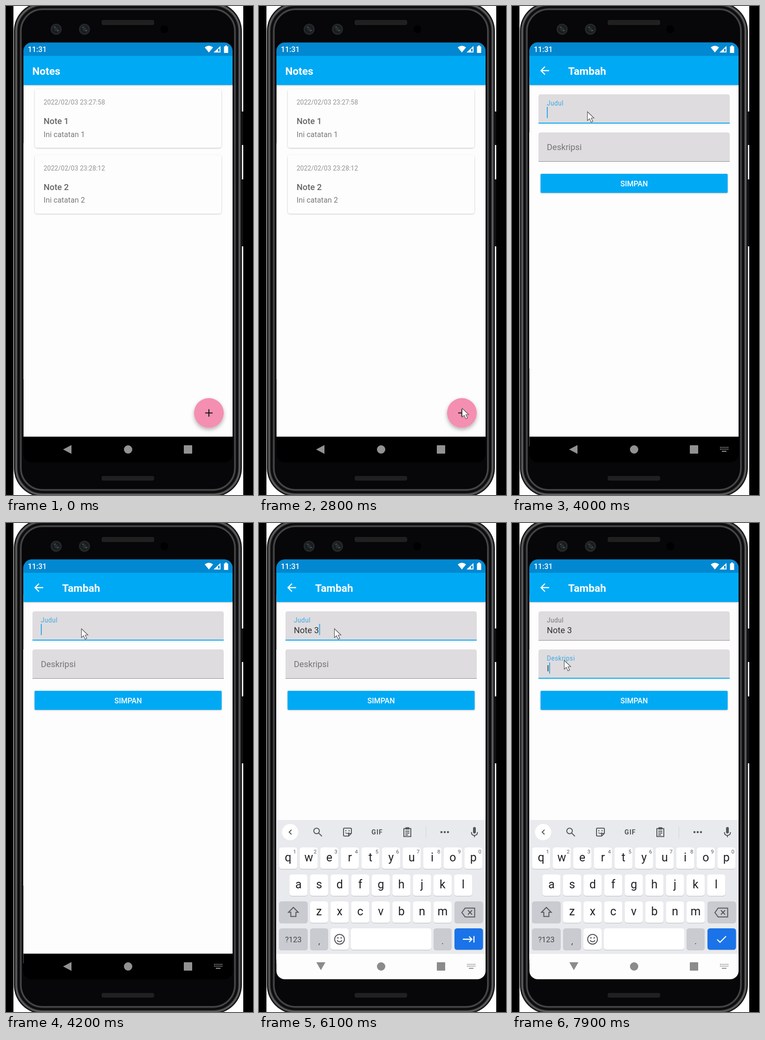
These frames come from a looping animation (532x1052 px, 8 s). An HTML page:

```html
<!DOCTYPE html>
<html lang="id">
<head>
<meta charset="utf-8">
<title>Notes</title>
<style>
html, body { margin: 0; width: 100%; height: 100%; overflow: hidden; background: #000; }
svg { display: block; width: 100vw; height: 100vh; font-family: Roboto, sans-serif; }
.med { font-weight: 500; }
.mid { text-anchor: middle; }
.title { font-size: 22.7px; font-weight: 700; fill: #fff; }
.date { font-size: 13.8px; letter-spacing: .12px; fill: #929292; }
.head { font-size: 18.3px; font-weight: 500; fill: #666; }
.body { font-size: 16px; letter-spacing: .1px; fill: #777; }
.hint { font-size: 18.3px; fill: #757477; }
.typed { font-size: 18.3px; fill: #303033; }
.line { fill: none; stroke-width: 2; }
.bold { fill: none; stroke: #fff; stroke-width: 2.3; }
.icon { fill: none; stroke: #53565a; stroke-width: 2; }

/* one 8 s clock; percent = ms / 80 */
.a { animation: 8s linear infinite; }
.s { animation: 8s step-end infinite; }
#list, #form { transform-origin: 263px 510px; }
#list { animation-name: recede; }
#dim { animation-name: dim; }
#form { animation-name: arrive, appear; }
#cursor { animation-name: travel; }
#imeIcon { animation-name: ime; }
#lightNav { animation-name: nav; }
#board { animation-name: rise; }
#label1 { animation-name: label1; }
#label2 { animation-name: label2; }
#line1 { animation-name: line1; }
#line2, #check { animation-name: second; }
#next { animation-name: first; }
#type1 { animation-name: type1; }
#caret1 { animation-name: blink1; }
#caret2 { animation-name: blink2; }
#text2 { animation-name: text2; }
#type2 { animation-name: type2; }
.upper { animation-name: upper; }
.lower { animation-name: lower; }

@keyframes recede {
  0%, 35.275% { transform: scale(1); animation-timing-function: cubic-bezier(.3,0,.8,.15); }
  36.11% { transform: scale(1.02); animation-timing-function: cubic-bezier(.05,.7,.1,1); }
  40.275%, 100% { transform: scale(1.05); }
}
@keyframes arrive {
  0%, 35.275% { transform: scale(.85); animation-timing-function: cubic-bezier(.3,0,.8,.15); }
  36.11% { transform: scale(.91); animation-timing-function: cubic-bezier(.05,.7,.1,1); }
  40.275%, 100% { transform: scale(1); }
}
@keyframes appear { 0%, 35.9% { opacity: 0; } 36.94%, 100% { opacity: 1; } }
@keyframes dim { 0%, 35.275% { opacity: 0; } 37.5%, 100% { opacity: .33; } }
@keyframes travel {
  0% { transform: translate(437px,865px); opacity: 0; animation-timing-function: step-end; }
  30%, 41.25% { transform: translate(437px,865px); opacity: 1; animation-timing-function: ease-in-out; }
  46.25%, 77.5% { transform: translate(162px,227px); opacity: 1; animation-timing-function: ease-in-out; }
  85%, 100% { transform: translate(112px,295px); opacity: 1; }
}
@keyframes ime { 0% { opacity: 0; } 48.75%, 100% { opacity: 1; } }
@keyframes nav { 0% { opacity: 0; } 53.75%, 100% { opacity: 1; } }
@keyframes rise {
  0%, 53.75% { transform: translateY(345px); animation-timing-function: cubic-bezier(0,0,.2,1); }
  56.5%, 100% { transform: none; }
}
@keyframes label1 {
  0%, 47.5% { font-size: 18.3px; letter-spacing: 0; transform: none; fill: #757477; }
  49.6%, 86.875% { font-size: 13.75px; letter-spacing: .46px; transform: translateY(-13.7px); fill: #3fa9e0; }
  87.5%, 100% { font-size: 13.75px; letter-spacing: .46px; transform: translateY(-13.7px); fill: #757477; }
}
@keyframes label2 {
  0%, 86.875% { font-size: 18.3px; letter-spacing: 0; transform: none; fill: #757477; }
  89%, 100% { font-size: 13.75px; letter-spacing: .46px; transform: translateY(-13.2px); fill: #3fa9e0; }
}
@keyframes line1 { 0% { opacity: 0; } 47.5% { opacity: 1; } 87.5%, 100% { opacity: 0; } }
@keyframes first { 0% { opacity: 1; } 87.5%, 100% { opacity: 0; } }
@keyframes second { 0% { opacity: 0; } 87.5%, 100% { opacity: 1; } }
@keyframes type1 {
  0% { transform: none; }
  63.75% { transform: translateX(13px); }
  66.25% { transform: translateX(23.5px); }
  68.75% { transform: translateX(29.5px); }
  70% { transform: translateX(39.2px); }
  71.25% { transform: translateX(43.7px); }
  73.75%, 100% { transform: translateX(54.5px); }
}
@keyframes blink1 {
  0% { opacity: 0; } 48.75% { opacity: 1; } 53.75% { opacity: 0; }
  60% { opacity: 1; } 80%, 100% { opacity: 0; }
}
@keyframes blink2 { 0% { opacity: 0; } 87.5% { opacity: 1; } 93.75% { opacity: 0; } 97.5%, 100% { opacity: 1; } }
@keyframes text2 { 0% { opacity: 0; } 97.5%, 100% { opacity: 1; } }
@keyframes type2 { 0% { transform: none; } 97.5%, 100% { transform: translateX(5px); } }
@keyframes upper {
  0% { opacity: 1; } 63.75% { opacity: 0; } 88.75% { opacity: 1; } 97.5%, 100% { opacity: 0; }
}
@keyframes lower {
  0% { opacity: 0; } 63.75% { opacity: 1; } 88.75% { opacity: 0; } 97.5%, 100% { opacity: 1; }
}
</style>
</head>
<body>
<svg viewBox="0 0 532 1052" preserveAspectRatio="none">
  <defs>
    <clipPath id="screen"><rect x="37.5" y="78.5" width="450.5" height="903" rx="18"/></clipPath>
    <filter id="soft" x="-20%" y="-20%" width="140%" height="150%">
      <feDropShadow dx="0" dy="1" stdDeviation="1.5" flood-opacity=".25"/>
    </filter>
    <filter id="lift" x="-30%" y="-30%" width="160%" height="170%">
      <feDropShadow dx="0" dy="4" stdDeviation="4" flood-opacity=".3"/>
    </filter>
    <filter id="glow" filterUnits="userSpaceOnUse" x="0" y="-20" width="532" height="1092">
      <feGaussianBlur stdDeviation="1"/>
    </filter>
    <linearGradient id="side"><stop stop-color="#48484a"/><stop offset=".4" stop-color="#1a1a1b"/><stop offset="1" stop-color="#0a0a0b"/></linearGradient>
    <pattern id="mesh" width="3" height="3" patternUnits="userSpaceOnUse">
      <rect width="3" height="3" fill="#1d1d1e"/><rect width="1" height="3" fill="#272728"/>
    </pattern>
    <g id="lens">
      <circle r="12" fill="#23272a"/><circle r="8.5" fill="#181c1e"/>
      <circle r="4" fill="#282d30"/>
      <path d="M-5-4l4-1M2 4l4-2" stroke="#596064" stroke-width="1.5"/>
    </g>
    <g id="chrome">
      <rect x="10" y="40" width="506" height="68" fill="#0288d1"/>
      <rect x="37.5" y="107" width="450.5" height="820" fill="#fefdfe"/>
      <rect x="37.5" y="107" width="450.5" height="63" fill="#03a9f4" filter="url(#soft)"/>
      <rect x="37.5" y="926.5" width="450.5" height="90" fill="#000"/>
    </g>
    <g id="ime">
      <path d="M448 949.5h18M448 953.5h18" stroke="#929292" stroke-width="2" stroke-dasharray="2 1.2"/>
      <path d="M452 958h10" stroke="#929292" stroke-width="2"/>
    </g>
  </defs>

  <!-- phone -->
  <rect x="16" width="495" height="1052" fill="#fff"/>
  <rect x="505" y="227" width="6" height="72" fill="url(#side)"/>
  <rect x="505" y="373" width="6" height="144" fill="url(#side)"/>
  <rect x="17" y="-8" width="491" height="1064" rx="62" fill="#0b0b0c"/>
  <g fill="none" filter="url(#glow)">
    <rect x="22" y="-3" width="481" height="1054" rx="57" stroke="#68686a" stroke-width="4"/>
    <rect x="32" y="7" width="461" height="1034" rx="47" stroke="#5c5c5e" stroke-width="3"/>
  </g>
  <rect x="34" y="9" width="457" height="1030" rx="45" fill="#070608"/>
  <use href="#lens" x="108" y="50"/><use href="#lens" x="169" y="50"/>
  <circle cx="341" cy="50" r="8.5" fill="#000"/>
  <rect x="206" y="30" width="113" height="11" rx="4" fill="url(#mesh)"/>
  <rect x="206" y="1011" width="113" height="10" rx="4" fill="url(#mesh)"/>

  <g clip-path="url(#screen)">
    <g id="list" class="a">
      <use href="#chrome"/>
      <text class="title" x="56.5" y="148">Notes</text>
      <g filter="url(#soft)">
        <rect x="62" y="179" width="402" height="126" rx="5" fill="#fefdfe"/>
        <rect x="62" y="320.5" width="402" height="126" rx="5" fill="#fefdfe"/>
      </g>
      <text class="date" x="81" y="212">2022/02/03 23:27:58</text>
      <text class="head" x="81" y="254">Note 1</text>
      <text class="body" x="81" y="281.5">Ini catatan 1</text>
      <text class="date" x="81" y="354">2022/02/03 23:28:12</text>
      <text class="head" x="81" y="396">Note 2</text>
      <text class="body" x="81" y="423">Ini catatan 2</text>
      <circle cx="437" cy="875.5" r="32" fill="#f48fb1" filter="url(#lift)"/>
      <path class="line" d="M429 875.5h16M437 867.5v16" stroke="#111"/>
    </g>
    <rect id="dim" class="a" x="37" y="107" width="452" height="880"/>

    <g id="form" class="a">
      <use href="#chrome"/>
      <path class="bold" d="M80 139H63M71 130.5L62.5 139L71 147.5"/>
      <text class="title" x="121" y="148">Tambah</text>
      <path id="box" d="M57 253V195q0-5 5-5h402q5 0 5 5v58z" fill="#dedcdf"/>
      <use href="#box" y="82"/>
      <path d="M57 252.5h412M57 334.5h412" stroke="#8d8b8e"/>
      <text class="typed" x="75" y="236.5">Note 3</text>
      <g id="type1" class="s">
        <rect x="75" y="216" width="62" height="27" fill="#dedcdf"/>
        <rect id="caret1" class="s" x="75" y="217" width="2" height="24" fill="#2fa8ea"/>
      </g>
      <text id="label1" class="hint a" x="75" y="227.5">Judul</text>
      <rect id="line1" class="s" x="57" y="251" width="412" height="2" fill="#03a9f4"/>
      <text id="text2" class="typed s" x="75" y="319">I</text>
      <g id="type2" class="s"><rect id="caret2" class="s" x="75" y="300" width="2" height="24" fill="#2fa8ea"/></g>
      <text id="label2" class="hint a" x="75" y="309.5">Deskripsi</text>
      <rect id="line2" class="s" x="57" y="333" width="412" height="2" fill="#03a9f4"/>
      <rect x="61.5" y="361" width="403" height="41" rx="2" fill="#03a9f4" filter="url(#soft)"/>
      <text class="med mid" x="263" y="388" font-size="16" fill="#fff">SIMPAN</text>
    </g>

    <!-- system bars -->
    <text class="med" x="47" y="99" font-size="16" fill="#fff">11:31</text>
    <g fill="#fff">
      <path d="M437 100L428 89q9-7 18 0z"/>
      <path d="M447 100L462 86V100z"/><path d="M457 92h3v6h-3z" fill="#0288d1"/>
      <path d="M469.5 87h2.5v-2h4v2h2.5v14h-9z"/>
    </g>
    <g fill="#929292">
      <path d="M123 954l18-9.5v19z"/><circle cx="263" cy="954" r="9"/>
      <rect x="383" y="945" width="18" height="18" rx="1"/>
      <use id="imeIcon" class="s" href="#ime"/>
    </g>

    <g id="board" class="a">
      <rect x="37" y="639" width="452" height="300" fill="#e8eaed"/>
      <circle cx="67" cy="665" r="17.5" fill="#fff"/>
      <g class="icon">
        <path d="M70 660l-5 5 5 5"/>
        <circle cx="124" cy="662.5" r="6"/><path d="M128.5 667l7 7"/>
        <path d="M184 656.5h13q2 0 2 2v9l-6 6h-9q-2 0-2-2v-13q0-2 2-2zM193 673v-5h6"/>
        <path d="M186 666q4 4 8 0" stroke-width="1.5"/>
        <path d="M312 657.5h15v17h-15zM315 663h9M315 667h9M315 671h6"/>
        <path d="M457.5 665q0 7 6.5 7t6.5-7M464 672v4"/>
      </g>
      <g fill="#53565a">
        <circle cx="187" cy="662" r="1.3"/><circle cx="194" cy="662" r="1.3"/>
        <rect x="315" y="654.5" width="9" height="5" rx="1.5"/>
        <rect x="461" y="654" width="6" height="14" rx="3"/>
        <circle cx="393" cy="665" r="2.3"/><circle cx="400" cy="665" r="2.3"/><circle cx="407" cy="665" r="2.3"/>
        <text class="mid" x="254.5" y="670" font-size="14" font-weight="700" letter-spacing="1">GIF</text>
      </g>
      <path d="M359.5 653v25" stroke="#d0d2d5"/>
      <g id="keys"></g>
      <path class="upper s" d="M74 825.5l12 12h-6v10h-12v-10h-6z" fill="#3c4043"/>
      <path class="lower s icon" d="M74 827l10.5 10.5h-5v9h-11v-9h-5z"/>
      <path class="icon" d="M437 838l7-9.5h20.5v19H444zM450 833l9 9.5M459 833l-9 9.5"/>
      <g fill="#44474b" class="mid">
        <text x="74" y="902" font-size="16.5">?123</text>
        <text x="129.5" y="906" font-size="19">,</text>
        <text x="395.5" y="906" font-size="19">.</text>
      </g>
      <circle class="icon" cx="173.5" cy="895.5" r="10.5"/>
      <g fill="#53565a"><circle cx="170" cy="892.5" r="1.6"/><circle cx="177" cy="892.5" r="1.6"/></g>
      <path class="icon" d="M168 898q5.5 6 11 0"/>
      <path id="next" class="bold s" d="M439 895.5h19M452.5 889.5l6 6-6 6M463 888.5v14"/>
      <path id="check" class="bold s" d="M442 896l6 6 13-13"/>
    </g>
    <g id="lightNav" class="s" fill="#8b8b8b">
      <rect x="37" y="927" width="452" height="60" fill="#fefdfe"/>
      <path d="M123.5 945h19.5l-9.75 17z"/><circle cx="263" cy="954" r="9"/>
      <rect x="383" y="945" width="18" height="18" rx="1"/>
      <use href="#ime"/>
    </g>
  </g>

  <path id="cursor" class="a" d="M.5.5v19l4.5-4 3.5 7.5 3.5-1.5-3.5-7.5h6z" fill="#fff" stroke="#555" stroke-width="1.2"/>
</svg>
<script>
const keys = document.getElementById('keys');

function add(tag, attrs, text = '') {
  const el = document.createElementNS('http://www.w3.org/2000/svg', tag);
  for (const name in attrs) el.setAttribute(name, attrs[name]);
  el.textContent = text;
  keys.append(el);
}

function key(x, y, width, fill = '#fff') {
  const box = { x, width, height: 46, rx: 5.5 };
  add('rect', { ...box, y: y + 1.3, fill: '#c3c6ca' });
  add('rect', { ...box, y, fill });
}

const pitch = 44.35, grey = '#cacbd1';
const rows = [['qwertyuiop', 62.7, 698], ['asdfghjkl', 85, 756], ['zxcvbnm', 129.3, 814]];

for (const [letters, start, y] of rows) {
  [...letters].forEach((c, i) => {
    const x = start + i * pitch;
    key(x - 19.5, y, 39);
    const style = { x, 'font-size': 25, fill: '#202124' };
    add('text', { ...style, y: y + 32.5, class: 'mid upper s' }, c.toUpperCase());
    add('text', { ...style, y: y + 29.5, class: 'mid lower s' }, c);
    if (y === 698) {
      add('text', { x: x + 14, y: 711, class: 'mid', 'font-size': 11.5, fill: '#55585c' }, (i + 1) % 10);
    }
  });
}

key(43, 814, 62, grey);
key(421, 814, 61.5, grey);
key(43, 872, 62, grey);
key(110, 872, 39, grey);
key(154, 872, 39);
key(198, 872, 173);
key(376, 872, 39, grey);
key(421, 872, 61.5, '#1a73e8');
</script>
</body>
</html>
```
